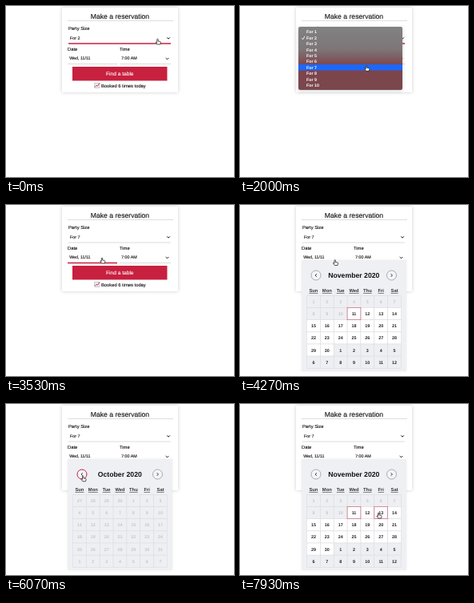
These frames come from a looping animation (285x214 px, 8 s). An HTML page:

```html
<!DOCTYPE html>
<html lang="en">
<head>
<meta charset="utf-8">
<title>Make a reservation</title>
<style>
html, body { margin: 0; width: 100%; height: 100%; overflow: hidden; background: #fff; }
svg { display: block; width: 285px; height: 214px; font-family: "Liberation Sans", Arial, sans-serif; text-rendering: geometricPrecision; }
#card { filter: drop-shadow(0 .5px 2px #0003); }
#card text { stroke: currentColor; stroke-width: .12px; }
#menu { filter: drop-shadow(0 1px 2px #0003); }
#calendar { filter: drop-shadow(0 0 1.5px #0001); }
</style>
</head>
<body>
<svg id="stage" viewBox="0 0 285 214">
  <defs>
    <linearGradient id="glass" x2="0" y2="1">
      <stop stop-color="#828282"/>
      <stop offset=".36" stop-color="#7d7577"/>
      <stop offset=".62" stop-color="#7d444b"/>
      <stop offset="1" stop-color="#7a474d"/>
    </linearGradient>
  </defs>
</svg>
<script>
const LOOP = 8000, RED = '#c8203f', GREY = '#d4d4d4';
const stage = document.getElementById('stage');

function add(parent, tag, attrs, content = '') {
  const node = document.createElementNS('http://www.w3.org/2000/svg', tag);
  set(node, attrs);
  node.textContent = content;
  return parent.appendChild(node);
}
function set(node, attrs) {
  for (const key in attrs) node.setAttribute(key, attrs[key]);
}
const group = id => add(stage, 'g', { id });
const box = (g, x, y, width, height, fill, more) =>
  add(g, 'rect', { x, y, width, height, fill, ...more });
const text = (g, x, y, size, content, more) =>
  add(g, 'text', { x, y, 'font-size': size, fill: '#111', color: '#111', ...more }, content);
const stroke = (g, d, color, width, more) =>
  add(g, 'path', { d, fill: 'none', stroke: color, 'stroke-width': width, ...more });
const middle = { 'text-anchor': 'middle' };
const bold = { ...middle, 'font-weight': 700 };

// Reservation form
const card = group('card');
box(card, 70, 2, 145, 106, '#fff');
text(card, 142.5, 16, 8.65, 'Make a reservation', middle);
stroke(card, 'M77 18.5H209', '#d0d0d0', .7);
text(card, 78, 30.4, 5.8, 'Party Size');
const party = text(card, 80, 42.1, 5.4, 'For 2');
text(card, 77, 56, 5.8, 'Date');
text(card, 142, 56, 5.8, 'Time');
text(card, 79.2, 67.4, 5.3, 'Wed, 11/11');
text(card, 144, 67.4, 5.4, '7:00 AM');
stroke(card, 'M201.3 39.4l1.8 1.8 1.8-1.8M199.7 65l1.8 1.8 1.8-1.8', '#111', 1);
const fields = [[78, 206, 47], [77, 139, 72.5], [142, 206, 72.5]].map(([left, right, y]) =>
  ({ left, right, y, line: stroke(card, `M${left} ${y}H${right}`, GREY, .8) }));
box(card, 83, 76, 118.5, 17.5, RED);
text(card, 142.3, 87, 6.6, 'Find a table', { ...middle, fill: '#fff', color: '#fff' });
box(card, 110.8, 96.3, 6.2, 6.2, '#f1eef0', { stroke: '#99a', 'stroke-width': .5 });
stroke(card, 'M111 101.5l2-2.2 1.3 1 2.6-3.6', RED, .9);
text(card, 119, 101.6, 5.8, 'Booked 6 times today');

// Party size menu
const ROW = 7.39, MENU_TOP = 28.8;
const menu = group('menu');
box(menu, 73, 26, 130, 79, 'url(#glass)', { rx: 2 });
const bar = box(menu, 73, 0, 130, ROW, '#1b68fb');
for (let i = 0; i < 10; i++)
  text(menu, 83, MENU_TOP + i * ROW + 5.6, 5.3, `For ${i + 1}`, { fill: '#fff', 'font-weight': 700 });
stroke(menu, 'M77.2 40.2l1.4 1.7 2.3-4', '#fff', .9);

// Calendar
const COL = 16.86, WEEK = 15.15, LEFT = 83.5, TOP = 113.4;
const calendar = group('calendar');
box(calendar, 77, 69, 131, 139, '#eff0f3');
const month = text(calendar, 142.3, 91.2, 8.7, '', bold);
const arrows = [[95, -1], [189.5, 1]].map(([x, side]) => {
  const ring = add(calendar, 'circle', { cx: x, cy: 88, r: 6, fill: '#f4f5f7' });
  stroke(calendar, `M${x - side * .8} 86.2l${side * 1.7} 1.8 ${-side * 1.7} 1.8`, '#222', .9);
  return { x, ring };
});
['Sun', 'Mon', 'Tue', 'Wed', 'Thu', 'Fri', 'Sat'].forEach((name, i) =>
  text(calendar, LEFT + (i + .5) * COL, 109.1, 5.8, name,
    { ...bold, fill: '#333', 'text-decoration': 'underline' }));
const cells = Array.from({ length: 42 }, (_, i) => {
  const x = LEFT + i % 7 * COL, y = TOP + Math.floor(i / 7) * WEEK;
  return {
    x, y,
    tile: box(calendar, x, y, COL, WEEK, '#fff', { stroke: '#dcdde1', 'stroke-width': .6 }),
    label: text(calendar, x + COL / 2, y + WEEK / 2 + 2, 5.4, '', bold)
  };
});
const frame = () => box(calendar, LEFT, TOP, COL, WEEK, 'none', { stroke: '#cf5f78', 'stroke-width': .65 });
const today = frame(), hovered = frame();
set(today, { x: cells[10].x, y: cells[10].y });

const november = i => i < 30 ? i + 1 : i - 29;
const october = i => i < 4 ? i + 27 : i < 35 ? i - 3 : i - 34;
let shownMonth;
function showMonth(isOctober) {
  if (shownMonth === isOctober) return;
  shownMonth = isOctober;
  month.textContent = isOctober ? 'October 2020' : 'November 2020';
  today.style.display = isOctober ? 'none' : '';
  cells.forEach(({ tile, label }, i) => {
    const past = isOctober || i < 10;
    label.textContent = (isOctober ? october : november)(i);
    set(label, { fill: past ? '#c6c7cb' : '#222' });
    set(tile, { fill: past || i > 29 ? '#eeeff2' : '#fff' });
  });
}

const hand = add(stage, 'path', {
  d: 'M-.7.6Q0-.3.7.6V3L3.3 3.5Q4 3.8 3.9 4.6L3.3 7H-.4L-2.2 4.6Q-2.3 3.7-1.5 3.9L-.7 4.6Z',
  fill: '#fff', stroke: '#111', 'stroke-width': .7, 'stroke-linejoin': 'round'
});

// Pointer stops: time, x, y
const stops = [
  [0, 189.5, 41], [600, 189.5, 41], [870, 174, 91], [1130, 165, 70], [1270, 165, 70], [1330, 164, 70],
  [1600, 164, 70], [1800, 158, 74.3], [2530, 158, 74.3], [3130, 128, 84], [3270, 128, 84],
  [3500, 120, 66], [4130, 120, 66], [4930, 104, 96.5], [5180, 96.2, 89.8], [6070, 96.2, 89.8],
  [6650, 190.3, 89.8], [7070, 190.3, 89.8], [7500, 179, 118], [7870, 160, 136], [7930, 173.2, 136],
  [LOOP, 173.2, 136]
];
function pointer(t) {
  const i = stops.findIndex(stop => stop[0] > t);
  const [t0, x0, y0] = stops[i - 1], [t1, x1, y1] = stops[i];
  const p = (t - t0) / (t1 - t0), e = p * p * (3 - 2 * p);
  return [x0 + (x1 - x0) * e, y0 + (y1 - y0) * e];
}

function draw(now) {
  const t = now % LOOP, [x, y] = pointer(t);
  set(hand, { transform: `translate(${x} ${y})` });

  const menuOpen = t >= 70 && t < 2420;
  menu.style.display = menuOpen ? '' : 'none';
  menu.style.opacity = Math.min(1, (2450 - t) / 200);
  bar.style.display = t >= 2130 && t < 2200 ? 'none' : '';
  set(bar, { y: MENU_TOP + Math.floor((y - MENU_TOP) / ROW) * ROW });
  party.textContent = t < 2530 ? 'For 2' : 'For 7';

  fields.forEach(({ left, right, y: base, line }, i) => {
    const inside = x > left && x < right && y > base - 13 && y < base + .5;
    const active = t < 2560 ? i === 0 : inside;
    set(line, { stroke: active ? RED : GREY, 'stroke-width': active ? 1.3 : .8 });
  });

  calendar.style.display = t >= 3870 ? '' : 'none';
  showMonth(t >= 5670 && t < 6730);
  for (const { x: cx, ring } of arrows) {
    const over = Math.hypot(x - cx, y - 88) < 6.5;
    set(ring, { stroke: over ? RED : '#8b8d92', 'stroke-width': over ? 1 : .7 });
  }
  const col = Math.floor((x - LEFT) / COL), row = Math.floor((y - TOP) / WEEK), index = row * 7 + col;
  const selectable = row >= 0 && index >= 10 && !shownMonth;
  hovered.style.display = selectable ? '' : 'none';
  if (selectable) set(hovered, { x: cells[index].x, y: cells[index].y });

  requestAnimationFrame(() => draw(performance.now()));
}
draw(0);
</script>
</body>
</html>
```
